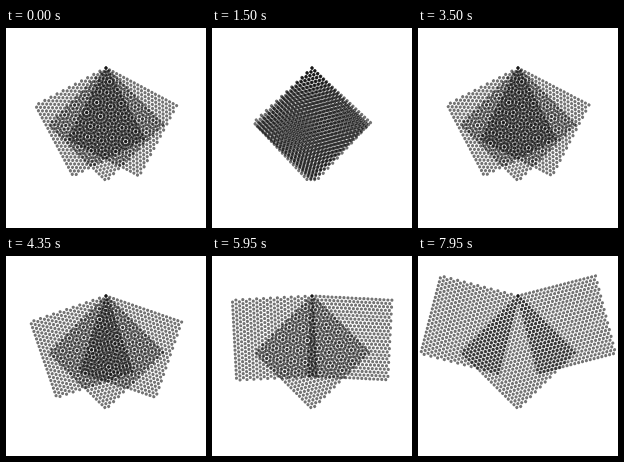
Recreate the animation shown at these times as an HTML page with a canvas. Size 200 by 200 pixels, loop 8 s.

```html
<!DOCTYPE html>
<html lang="en">
<head>
<meta charset="utf-8">
<title>Rotating dot lattices</title>
<style>
  html, body { margin: 0; width: 100%; height: 100%; overflow: hidden; background: #fff; }
  canvas { display: block; width: 200px; height: 200px; }
</style>
</head>
<body>
<canvas id="stage"></canvas>
<script>
const SIZE = 200, LOOP = 8000, TICK = 50, STEP_DEG = 0.5;
const PIVOT = { x: 100, y: 40 };
const SPACING = 4, ROWS = 24, COLS = 21, RADIUS = 1.6;

const canvas = document.getElementById('stage');
const scale = window.devicePixelRatio || 1;
canvas.width = canvas.height = SIZE * scale;
const ctx = canvas.getContext('2d');

// Hexagonal patch with one corner on the pivot; odd rows are one dot shorter.
const lattice = new Path2D();
for (let row = 0; row < ROWS; row++) {
  const odd = row % 2;
  for (let col = 0; col < COLS - odd; col++) {
    const x = (col + odd / 2) * SPACING;
    const y = row * SPACING * Math.sqrt(3) / 2;
    lattice.moveTo(x + RADIUS, y);
    lattice.arc(x, y, RADIUS, 0, 2 * Math.PI);
  }
}

// Close to 0, rest one tick, open to 60 degrees, rest, start closing again.
function spread(time) {
  const tick = Math.floor(time / TICK);
  if (tick <= 34) return (34 - tick) * STEP_DEG;
  if (tick < 159) return Math.min(tick - 35, 120) * STEP_DEG;
  return 119 * STEP_DEG;
}

function drawLattice(degrees) {
  ctx.save();
  ctx.translate(PIVOT.x, PIVOT.y);
  ctx.rotate((45 + degrees) * Math.PI / 180);
  ctx.fill(lattice);
  ctx.restore();
}

function draw(time) {
  const angle = spread(time);
  ctx.setTransform(scale, 0, 0, scale, 0, 0);
  ctx.fillStyle = '#fff';
  ctx.fillRect(0, 0, SIZE, SIZE);
  ctx.fillStyle = 'rgba(0, 0, 0, 0.55)';
  [0, angle, -angle].forEach(drawLattice);
}

const start = performance.now();
function frame() {
  draw((performance.now() - start) % LOOP);
  requestAnimationFrame(frame);
}
frame();
</script>
</body>
</html>
```
